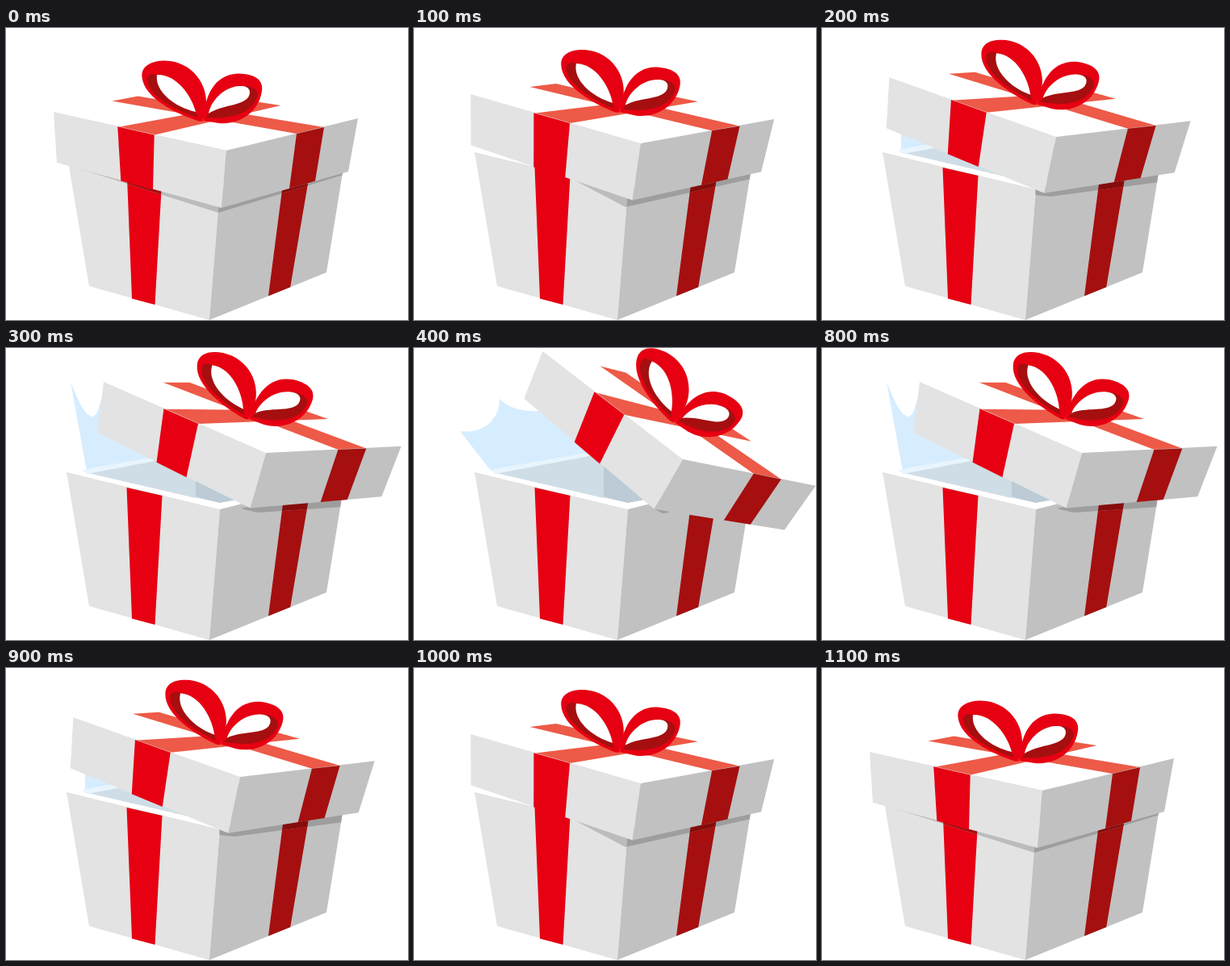
Write an HTML page that moves like this. It is 498 px wide and 362 px high and loops after 1200 ms.

```html
<!DOCTYPE html>
<html lang="en">
<head>
<meta charset="utf-8">
<title>Gift box</title>
<style>
  html, body { margin: 0; width: 100%; height: 100%; overflow: hidden; background: #fff; }
  svg { display: block; width: 498px; height: 362px; }
</style>
</head>
<body>
<svg viewBox="0 0 498 362">
  <defs>
    <clipPath id="shadeClip"><path id="shade"/></clipPath>
  </defs>

  <path id="flap" fill="#d6edff"/>

  <!-- inside of the box -->
  <path fill="#cfdde6" d="M97 154 L222 132 L235 131 V186 Z"/>
  <path fill="#bccbd5" d="M235 131 L302 150 V185 L265 192 L235 185 Z"/>
  <path fill="#e9f5fd" d="M94 151 L219 129 L222 133 L101 156 Z"/>

  <g id="body"></g>
  <g id="bodyShade" clip-path="url(#shadeClip)"></g>

  <g id="lid">
    <path fill="#fff" d="M59 104 L222 76 L436 112 L273 152 Z"/>
    <path fill="#ed5a47" d="M131.5 90.5 L163.5 84.5 L394 123 V124 L360 132 V131 Z"/>
    <path fill="#ed5a47" d="M138.3 123 V124 L184 134 V132.5 L340.5 96 L309.5 91.3 Z"/>
    <path fill="#e3e3e3" d="M59 104 L273 152 L267 223 L63 167 Z"/>
    <path fill="#c1c1c1" d="M273 152 L436 112 L424 178 L267 223 Z"/>
    <path fill="#e60012" d="M138.3 122.3 L183.7 132.5 L182 200.4 L142.3 189.5 Z"/>
    <path fill="#a50f0f" d="M360 131 L394 123 L383 189.8 L351 199 Z"/>

    <!-- bow, left loop -->
    <path fill="#e60012" d="M239 115.5 C212 107 171 87 168.5 61 C167 46 182 40.5 197 40.5 C231 41.5 250 70 248 96 L244 115.5 Z"/>
    <path fill="#a50f0f" d="M238 111 C212 103 176 84 175 64 C175 58 181 56 187 58 C212 57 230 85 235 104 Z"/>
    <path fill="#fff" d="M235 104 C208 98 184 78 187 58 C212 57 230 85 235 104 Z"/>
    <!-- bow, right loop -->
    <path fill="#e60012" d="M245 115 C245 87 257 57 288 56.5 C308 57 319 64 317 78 C313 106 287 120 264 118 Z"/>
    <path fill="#a50f0f" d="M248 111 L251 106 C254 90 270 73 289 72 C305 70 313 77 311 84 C307 103 283 114 248 111 Z"/>
    <path fill="#fff" d="M251 106 C254 90 270 73 289 72 C303 71 304 80 300 86 C291 97 268 95 251 106 Z"/>
  </g>
</svg>

<script>
const el = id => document.getElementById(id);
const STEP = 100;

// Box walls, drawn once lit and once shaded (the shaded copy is clipped).
const walls = (front, side, ribbon, sideRibbon) => `
  <path fill="${front}" d="M75 154 L265 200 L252 362 L103 320 Z"/>
  <path fill="${side}" d="M265 200 L420 161 L397 303 L252 362 Z"/>
  <path fill="${ribbon}" d="M149.5 173 L193.5 183 L184.5 343 L156 335.5 Z"/>
  <path fill="${sideRibbon}" d="M344.7 180 L376.5 178 L352.2 321.3 L325 332.3 Z"/>`;
el('body').innerHTML = walls('#e3e3e3', '#c1c1c1', '#e60012', '#a50f0f');
el('bodyShade').innerHTML = walls('#bcbcbc', '#9e9e9e', '#a50f0f', '#870c0c');

// Lid poses: position of the near top corner, tilt, and the shadow it casts.
const lids = [
  { x: 273, y: 152, tilt: 0, shade: 'M77 170 L267 221 L418 179 V182 L263 229 Z' },
  { x: 281, y: 143, tilt: 3.5, shade: 'M190 184 L271 211 L418 178 V187 L262 222 Z' },
  { x: 290, y: 135, tilt: 7, shade: 'M264 199 L276 203 L418 181 V191 L283 209 L264 207 Z' },
  { x: 322, y: 130, tilt: 11, shade: 'M291 199 L304 196 L416 187 V197 L312 204 Z' },
  { x: 333, y: 138, tilt: 25, shade: 'M297 199 L308 205 L316 204 L312 200 Z' }
];

// Flap outlines: hinge, tip, then two scallops.
const tucked = [98, 155, 98, 100, 105, 110, 120, 110, 130, 100, 140, 110, 150, 100];
const upright = [100, 153, 80, 42, 88, 62, 108, 112, 117, 66, 130, 80, 160, 80];
const leaning = [93, 152, 76, 57, 84, 78, 122, 85, 131, 49, 145, 70, 180, 60];
const spread = [95, 152, 57, 103, 85, 107, 106, 90, 106, 63, 122, 80, 158, 78];
const mid = (a, b) => a.map((v, i) => (v + b[i]) / 2);

const flapPath = p =>
  `M${p.slice(0, 2)} L${p.slice(2, 4)} C${p.slice(4, 10)} Q${p.slice(10)} L220 130 Z`;

const poses = [
  [0, tucked], [1, tucked], [2, tucked], [3, upright],
  [4, spread], [4, mid(spread, leaning)], [4, leaning], [4, mid(leaning, upright)],
  [3, upright], [2, tucked], [1, tucked], [0, tucked]
];

function draw(ms) {
  const [level, flap] = poses[Math.floor(ms / STEP) % poses.length];
  const { x, y, tilt, shade } = lids[level];
  el('lid').setAttribute('transform', `translate(${x} ${y}) rotate(${tilt}) translate(-273 -152)`);
  el('shade').setAttribute('d', shade);
  el('flap').setAttribute('d', flapPath(flap));
}

const start = performance.now();
function tick() {
  draw(performance.now() - start);
  requestAnimationFrame(tick);
}
tick();
</script>
</body>
</html>
```
